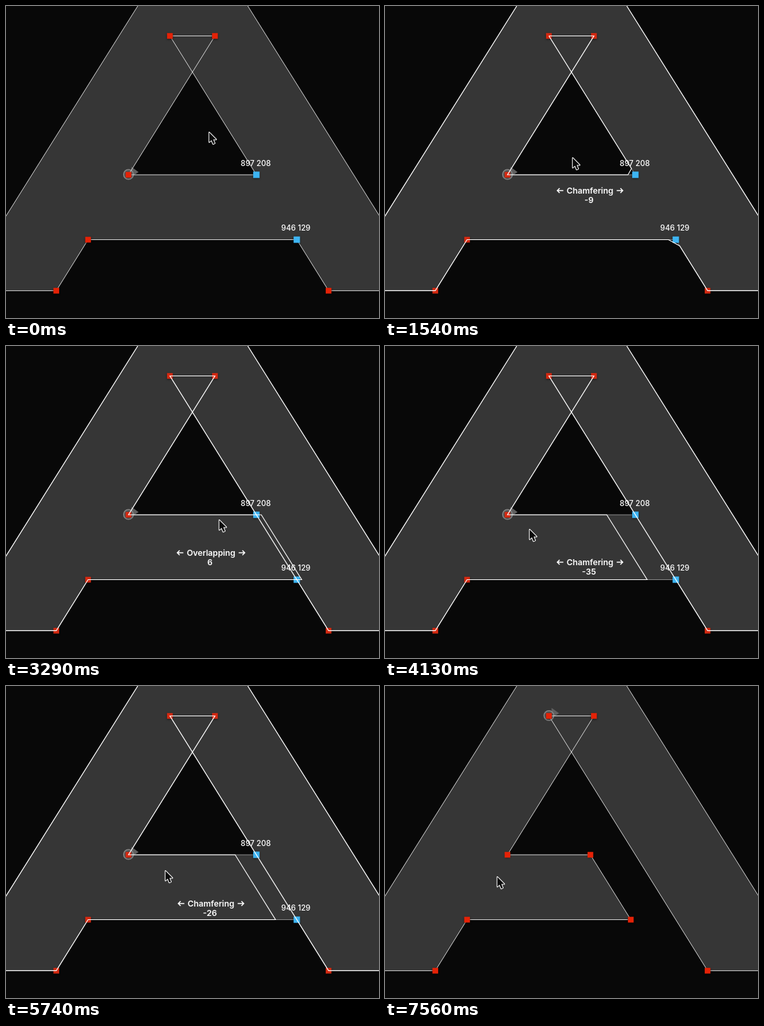
Animation, 554 px wide and 464 px high, one loop 7.7 s. Source, as an HTML page with a canvas:

```html
<!DOCTYPE html>
<html lang="en">
<head>
<meta charset="utf-8">
<title>Opening a corner</title>
<style>
html, body { margin: 0; width: 100%; height: 100%; overflow: hidden; background: #080808; }
canvas { display: block; }
</style>
</head>
<body>
<canvas id="stage" width="554" height="464"></canvas>
<script>
const W = 554, H = 464;
const ctx = document.getElementById('stage').getContext('2d');
const LOOP = 7700, STEP = 70;
const PRESS = 490, JOIN = 2940, RELEASE = 7350;
const UNIT = 1.215;
const FONT = 'Inter, "Open Sans", sans-serif';
const DARK = '#080808', GRAY = '#363636', RED = '#e52207', DIM_RED = '#d42a12', BLUE = '#3db4f2';

// The letter mirrors around AXIS; its inner edges cross at CROSS_Y
const AXIS = 276.9, CROSS_Y = 98.3;
const inner = (side, y) => [AXIS + side * (y - CROSS_Y) * 0.622, y];
const outer = (side, y) => [AXIS + 0.5 + side * (81.7 + y * 0.6265), y];
const pair = y => [inner(-1, y), inner(1, y)];

const [TR, TL] = pair(44.5);
const [IL, IR] = pair(251);
const [BL, BR] = pair(347.5);
const [FL, FR] = pair(423.4);
const CROSS = [AXIS, CROSS_Y];
const FOOT = FL[1];
const sides = [-1, 1].map(s => [outer(s, 0), outer(s, FOOT)]);
const frameLines = [...sides, [[0, FOOT], FL], [FR, [W, FOOT]]];

// Turning points of the drag: time, offset in font units, pointer height
const KEYS = [
  [420, 0, 188], [1050, 25, 217], [1540, -9, 226], [1920, -21, 231],
  [2240, 52, 232], [2450, 63, 236], [3290, 6, 259], [4130, -35, 273],
  [4400, -38, 275], [5180, 58, 268], [5460, 58, 268], [5740, -26, 275],
  [6020, -33, 277], [6860, -55, 284]
];

function slope(i, c) {
  const p = KEYS[i - 1], k = KEYS[i], n = KEYS[i + 1];
  if (!p || !n) return 0;
  const a = (k[c] - p[c]) / (k[0] - p[0]), b = (n[c] - k[c]) / (n[0] - k[0]);
  return a * b > 0 ? 2 * a * b / (a + b) : 0;
}

// Monotone cubic through the keys
function sample(t, c) {
  const last = KEYS.length - 1;
  t = Math.min(Math.max(t, KEYS[0][0]), KEYS[last][0]);
  let i = 0;
  while (i < last - 1 && KEYS[i + 1][0] < t) i++;
  const a = KEYS[i], b = KEYS[i + 1], h = b[0] - a[0], u = (t - a[0]) / h;
  const w = u * u * (3 - 2 * u);
  return a[c] * (1 - w) + b[c] * w
    + h * u * (1 - u) * ((1 - u) * slope(i, c) - u * slope(i + 1, c));
}

// The pointer runs slightly ahead on the right
const pointerX = v => 301 + 2.53 * v + 0.0014 * v * v;

const shift = ([x, y], d) => [x + d, y];

function extend(from, to, d) {
  const dx = to[0] - from[0], dy = to[1] - from[1], n = Math.hypot(dx, dy);
  return [to[0] + dx / n * d, to[1] + dy / n * d];
}

function trace(points, close) {
  points.forEach((p, i) => i ? ctx.lineTo(...p) : ctx.moveTo(...p));
  if (close) ctx.closePath();
}

function fill(paths, color) {
  ctx.beginPath();
  paths.forEach(p => trace(p, true));
  ctx.fillStyle = color;
  ctx.fill('evenodd');
}

function stroke(paths, color, width) {
  ctx.beginPath();
  paths.forEach(p => trace(p));
  ctx.strokeStyle = color;
  ctx.lineWidth = width;
  ctx.stroke();
}

const closedPaths = () =>
  [...frameLines, [TL, TR, IL, IR, TL], [FL, BL, BR, FR]];

const chamferPaths = d => [...frameLines,
  [TL, TR, IL, shift(IR, d), extend(TL, IR, d), TL],
  [FL, BL, shift(BR, d), extend(FR, BR, d), FR]];

const joinedPaths = d =>
  [...frameLines, [FR, TL, TR, IL, shift(IR, d), shift(BR, d), BL, FL]];

function drawLetter(d, open) {
  const [[lt, lb], [rt, rb]] = sides;
  ctx.fillStyle = DARK;
  ctx.fillRect(0, 0, W, H);
  fill(open
    ? [[lt, rt, rb, FR, CROSS, IL, shift(IR, d), shift(BR, d), BL, FL, lb]]
    : [[lt, rt, rb, FR, BR, BL, FL, lb], [CROSS, IL, IR]], GRAY);
}

function drawStart([x, y]) {
  fill([[[x + 4, y - 12], [x + 15, y - 4], [x + 4, y + 3]]], '#606060');
  ctx.beginPath();
  ctx.arc(x, y - 0.5, 7.2, 0, 7);
  ctx.fillStyle = '#545454';
  ctx.fill();
  ctx.strokeStyle = '#868686';
  ctx.lineWidth = 1.6;
  ctx.stroke();
}

function drawNode([x, y], color, size) {
  ctx.save();
  ctx.shadowColor = 'rgba(0,0,0,.55)';
  ctx.shadowBlur = 3;
  ctx.shadowOffsetY = 1;
  ctx.fillStyle = color;
  ctx.fillRect(x - size / 2, y - size / 2, size, size);
  ctx.restore();
}

function text(str, x, y, font) {
  ctx.font = font + ' ' + FONT;
  ctx.textAlign = 'center';
  ctx.fillStyle = '#fff';
  ctx.fillText(str, x, y);
}

function arrow(x, y, dir) {
  const tip = x + dir * 9, back = tip - dir * 3.5;
  stroke([[[x, y], [tip, y]], [[back, y - 3.5], [tip, y], [back, y + 3.5]]], '#fff', 1.5);
}

function drawLabel(y, v) {
  const word = v > 0 ? 'Overlapping' : 'Chamfering', x = 304.5, font = '600 12.2px';
  text(word, x, y + 4.5, font);
  const half = ctx.measureText(word).width / 2 + 5;
  for (const dir of [-1, 1]) arrow(x + dir * half, y + 0.5, dir);
  text(String(v), x - 1.5, y + 18.5, font);
}

function drawPointer(x, y) {
  const shape = [[0, 0], [0, 14.6], [3.4, 11.5], [5.8, 17.3], [8.3, 16.2], [5.9, 10.5], [10.4, 10.5]]
    .map(p => [p[0] + x + 0.8, p[1] + y]);
  ctx.lineJoin = 'round';
  stroke([[...shape, shape[0], shape[1]]], '#fff', 2);
  ctx.lineJoin = 'miter';
  fill([shape], '#0a0a0a');
}

function draw(t) {
  const v = Math.round(sample(t, 1)), d = v * UNIT;
  const x = Math.round(pointerX(sample(t, 1))), y = Math.round(sample(t, 2));
  const done = t >= RELEASE, dragging = t >= PRESS && !done;
  const red = [TL, TR, IL, BL, FL, FR];
  if (done) red.push(shift(IR, d), shift(BR, d));

  drawLetter(d, done);
  drawStart(done ? TL : IL);
  stroke(done ? joinedPaths(d) : closedPaths(), dragging ? '#a8a8a8' : '#d6d6d6', dragging ? 0.8 : 1);
  red.forEach(p => drawNode(p, dragging ? DIM_RED : RED, 8.5));
  if (!done) [IR, BR].forEach(p => drawNode(p, BLUE, 9.5));
  if (dragging) stroke(t < JOIN ? chamferPaths(d) : joinedPaths(d), '#fff', 1.15);
  if (!done) {
    text('897 208', 371, 237.5, '500 11.3px');
    text('946 129', 430.5, 334, '500 11.3px');
  }
  if (dragging) drawLabel(y + 48, v);
  drawPointer(x, y);
}

function tick() {
  const t = performance.now() % LOOP;
  draw(Math.floor(t / STEP) * STEP);
  requestAnimationFrame(tick);
}
tick();
</script>
</body>
</html>
```
